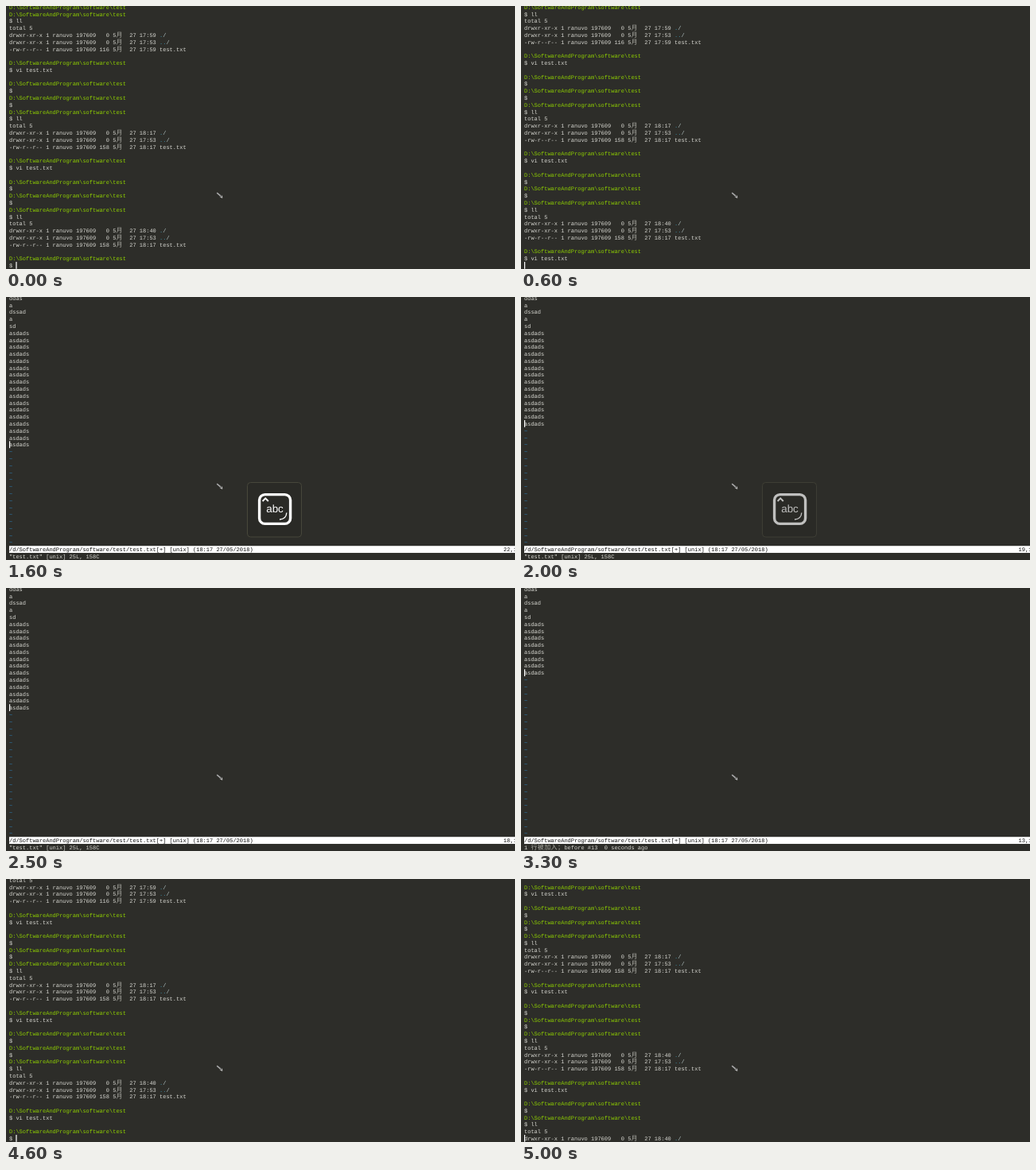
An HTML page with a canvas that plays this animation: 640x331 px, repeating every 5100 ms.

```html
<!DOCTYPE html>
<html lang="en">
<head>
<meta charset="utf-8">
<title>Terminal session</title>
<style>
  html, body { margin: 0; width: 100%; height: 100%; overflow: hidden; background: #2d2d29; }
  canvas { display: block; width: 640px; height: 331px; }
</style>
</head>
<body>
<canvas id="stage" width="640" height="331"></canvas>
<script>
const ctx = document.getElementById('stage').getContext('2d');
const LOOP = 5100, STEP = 100;
const LEFT = 4, CELL = 4.2, ROW = 8.79, LAST_ROW = 37;
const BG = '#2d2d29', FG = '#d8d8d2', GREEN = '#8fd000', BLUE = '#2c82bd', DIM = '#adada6';

const DIR = 'D:\\SoftwareAndProgram\\software\\test';
const VI = '$ vi test.txt';

const entry = (mode, size, time, name) =>
  `${mode} 1 ranuvo 197609 ${String(size).padStart(3)} 5月  27 ${time} ${name}`;

const listing = (dirTime, size, fileTime) => [
  '$ ll', 'total 5',
  entry('drwxr-xr-x', 0, dirTime, './'),
  entry('drwxr-xr-x', 0, '17:53', '../'),
  entry('-rw-r--r--', size, fileTime, 'test.txt'), ''
];

const edit = [DIR, VI, ''];
const idle = [DIR, '$', DIR, '$', DIR];
const log = [
  DIR, DIR, ...listing('17:59', 116, '17:59'),
  ...edit, ...idle, ...listing('18:17', 158, '18:17'),
  ...edit, ...idle, ...listing('18:40', 158, '18:17'),
  ...edit, DIR, '$', DIR, ...listing('18:40', 158, '18:17')
];

// [step, last log line, its text, cursor column]
const shell = [
  [0, 37, '$ ', 2], [1, 37, '$ v', 3], [2, 37, '$ vi', 4], [3, 37, '$ vi ', 5],
  [4, 37, '$ vi t', 6], [5, 37, VI, 13], [6, 38, '', 0],
  [46, 40, '$ ', 2], [47, 42, '$ ', 2], [48, 42, '$ l', 3], [49, 42, '$ ll', 4],
  [50, 44, log[44], 0]
];

// [step, lines in the file]
const lineCount = [
  [0, 25], [15, 24], [16, 22], [17, 21], [18, 20], [19, 19],
  [25, 18], [26, 16], [27, 14], [28, 13], [29, 12], [30, 13],
  [34, 15], [35, 18], [36, 20], [37, 21], [38, 22], [39, 23], [40, 24]
];

const message = [
  [0, '"test.txt" [unix] 25L, 158C'],
  [30, '1 行被加入；before #13  0 seconds ago'],
  [43, ':'], [44, ':q'], [45, ':q!']
];

// [step, label, opacity]
const capsKey = [
  [0, '', 0], [10, 'ABC', 1], [14, 'abc', 1], [19, 'abc', .85], [20, 'abc', .7],
  [21, 'abc', .5], [22, 'abc', .33], [23, 'abc', .15], [24, '', 0]
];

const at = (keys, step) => keys.filter(k => k[0] <= step).pop();
const rowTop = row => row * ROW - 3.2;
const isWide = ch => ch.charCodeAt(0) > 0x2e80;

function put(text, row, color = FG, col = 0) {
  for (const ch of text) {
    const wide = isWide(ch);
    ctx.font = wide ? '8px "Noto Sans CJK SC", "Noto Sans CJK", sans-serif'
                    : '7px "Liberation Mono", monospace';
    ctx.fillStyle = wide ? DIM : color;
    if (ch !== ' ') ctx.fillText(ch, LEFT + col * CELL, row * ROW + 3.8);
    col += wide ? 2 : 1;
  }
  return col;
}

function caret(col, row) {
  ctx.fillStyle = '#fff';
  ctx.fillRect(LEFT + col * CELL, rowTop(row), 1.2, ROW);
}

function putLog(text, row) {
  const folder = text.match(/^(.* )(\.+)\/$/);
  if (!folder) return put(text, row, text === DIR ? GREEN : FG);
  let col = put(folder[1], row);
  col = put(folder[2], row, '#3f8fa8', col);
  put('/', row, '#b4c4c4', col);
}

function drawShell(step) {
  const [, last, input, col] = at(shell, step);
  for (let row = 0; row <= LAST_ROW; row++) {
    const i = last - LAST_ROW + row;
    putLog(i === last ? input : log[i], row);
  }
  caret(col, LAST_ROW);
}

function drawEditor(step) {
  const count = at(lineCount, step)[1];
  const text = at(message, step)[1];
  const line = step < 12 ? 1 : count;
  const head = ['ddas', 'a', 'dssad', 'a', 'sd'];

  for (let row = 0; row < 36; row++) {
    if (row < count) put(head[row] || 'asdads', row);
    else put('~', row, BLUE);
  }

  ctx.fillStyle = '#fff';
  ctx.fillRect(LEFT, rowTop(36), 640 - LEFT, ROW);
  const changed = count < 25 ? '[+]' : '';
  put(`/d/SoftwareAndProgram/software/test/test.txt${changed} [unix] (18:17 27/05/2018)`, 36, '#111');
  put(`${line},1`, 36, '#111', line < 10 ? 149 : 148);

  put(text, LAST_ROW);
  if (text[0] === ':') caret(text.length, LAST_ROW);
  else caret(0, line - 1);
}

function drawCapsKey(step) {
  const [, label, alpha] = at(capsKey, step);
  if (!alpha) return;
  ctx.save();
  ctx.globalAlpha = alpha;
  ctx.lineWidth = 1;
  ctx.fillStyle = '#2a2a26';
  ctx.strokeStyle = '#47473b';
  ctx.beginPath();
  ctx.roundRect(303.5, 233.5, 68, 68.5, 4);
  ctx.fill();
  ctx.stroke();

  ctx.strokeStyle = ctx.fillStyle = '#fff';
  ctx.lineWidth = 3.4;
  ctx.beginPath();
  ctx.roundRect(318.6, 248.6, 39, 36.8, 7);
  ctx.stroke();

  ctx.lineWidth = 2;
  ctx.stroke(new Path2D('M322.6 257 L326.2 253.4 L329.8 257'));
  ctx.lineWidth = 1.3;
  ctx.stroke(new Path2D('M352.8 271.5 Q352.5 279.5 344 280'));

  ctx.font = `${label === 'ABC' ? 12.6 : 13.4}px "Liberation Sans", Arial, sans-serif`;
  ctx.textAlign = 'center';
  ctx.fillText(label, 338, 271.4);
  ctx.restore();
}

function drawPointer() {
  ctx.lineWidth = 1.6;
  ctx.strokeStyle = '#aaa';
  ctx.stroke(new Path2D('M265.2 235.2 L270 239.2'));
  ctx.lineWidth = 1;
  ctx.strokeStyle = '#d0d0d0';
  ctx.stroke(new Path2D('M269 239.8 L271.8 241.4 L271.4 238.6'));
}

function draw(step) {
  ctx.textRendering = 'geometricPrecision';
  ctx.fillStyle = BG;
  ctx.fillRect(0, 0, 640, 331);
  if (step >= 8 && step < 46) drawEditor(step);
  else drawShell(step);
  drawCapsKey(step);
  drawPointer();
}

let shown = -1;
function tick() {
  const step = Math.floor(performance.now() % LOOP / STEP);
  if (step !== shown) draw(shown = step);
  requestAnimationFrame(tick);
}
tick();
</script>
</body>
</html>
```
